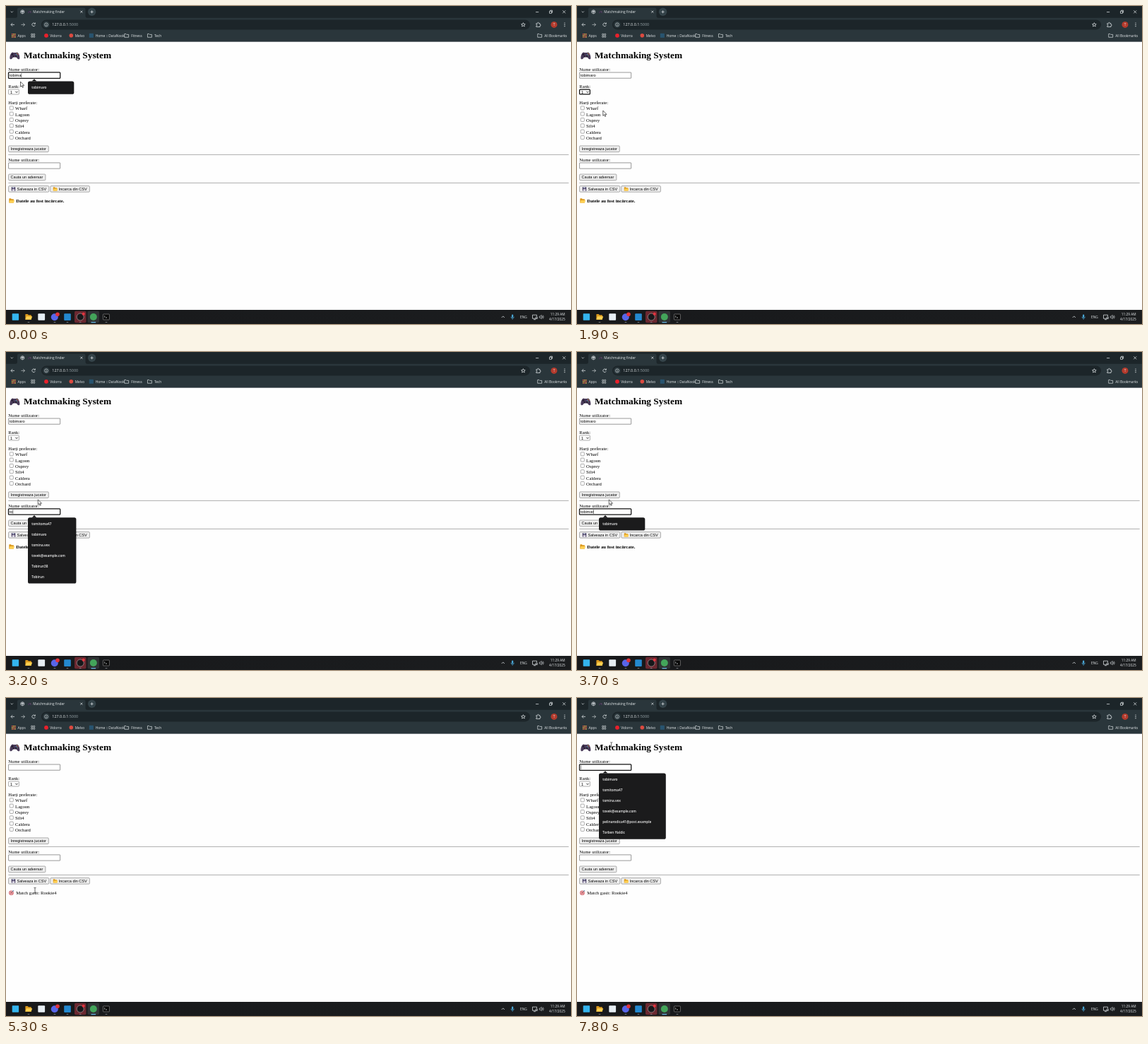
Recreate the animation shown at these times as an HTML page. Size 800 by 450 pixels, loop 8 s.

```html
<!DOCTYPE html>
<html lang="ro">
<head>
<meta charset="utf-8">
<title>Matchmaking finder</title>
<style>
html, body { margin: 0; width: 100%; height: 100%; overflow: hidden; background: #fff; }
svg { display: block; width: 100vw; height: 100vh; }
text { white-space: pre; }
.ui { font-family: "Open Sans", "Noto Sans", sans-serif; font-size: 4.8px; fill: #e6eaec; }
.page { font-family: "Liberation Serif", "Times New Roman", serif; font-size: 6.667px; }
.ctl { font-family: "Liberation Sans", Arial, sans-serif; font-size: 5.555px; }
.opt { font-family: "Open Sans", "Noto Sans", sans-serif; font-size: 4.75px; font-weight: 600; fill: #f1f1f1; }
.line { fill: none; stroke: #dfe5e7; stroke-width: .75; }
</style>
</head>
<body>
<svg id="stage" viewBox="0 0 800 450" preserveAspectRatio="none">
  <defs>
    <symbol id="pad" viewBox="0 0 16 12" overflow="visible">
      <path d="M4 1.2Q5 .7 6 1.5H10Q11 .7 12 1.2C14 2 15.6 7 15.4 9.6C15.2 12 13 11.7 11.4 9.6L10.4 8.3H5.6L4.6 9.6C3 11.7.8 12 .6 9.6C.4 7 2 2 4 1.2Z" fill="#493b59"/>
      <path d="M3 4.2H6M4.5 2.7V5.7" stroke="#201a2b" stroke-width="1.1"/>
      <circle cx="6.2" cy="7" r="1.2" fill="#241c30"/><circle cx="9.8" cy="7" r="1.2" fill="#241c30"/>
      <circle cx="11.5" cy="2.8" r=".7" fill="#d9a441"/><circle cx="13" cy="4.2" r=".7" fill="#d2485a"/>
      <circle cx="10.1" cy="4.2" r=".7" fill="#4e8fd0"/><circle cx="11.5" cy="5.5" r=".7" fill="#53a869"/>
    </symbol>
    <symbol id="folder" viewBox="0 0 16 14" overflow="visible">
      <path d="M1 2Q1 1 2 1H6L8 3H13Q14 3 14 4V13H1Z" fill="#dc9a1e"/>
      <path d="M3.5 6H16L13.6 13H1Z" fill="#ffd052"/>
    </symbol>
    <symbol id="disk" viewBox="0 0 14 14" overflow="visible">
      <path d="M1 1H13V13H2.5L1 11.5Z" fill="#45395f"/>
      <path d="M4 1H10.5V5H4Z" fill="#b8c4d6"/><path d="M3.2 7.5H10.8V13H3.2Z" fill="#e9e6f0"/>
      <path d="M8.2 1.6H9.6V4.3H8.2Z" fill="#45395f"/>
    </symbol>
    <symbol id="target" viewBox="0 0 16 16" overflow="visible">
      <circle cx="7.5" cy="8.5" r="7" fill="#cf4b55"/><circle cx="7.5" cy="8.5" r="5" fill="#f3e9e9"/>
      <circle cx="7.5" cy="8.5" r="3.4" fill="#cf4b55"/><circle cx="7.5" cy="8.5" r="1.4" fill="#f3e9e9"/>
      <path d="M7.5 8.5L14 2" stroke="#4d5560" stroke-width="1.2"/>
      <path d="M11.5 4.5L12 1.6L14 0L14.3 1.8L16 2.2L14.3 4Z" fill="#5b8fb5"/>
    </symbol>
    <symbol id="tray" viewBox="0 0 8 7" overflow="visible">
      <path class="line" d="M1 1H3L4 2H7.2V6.2H.8V1Z"/>
    </symbol>
    <linearGradient id="bar"><stop offset="0" stop-color="#18191b"/><stop offset="1" stop-color="#1b1d1f"/></linearGradient>
    <clipPath id="selClip"><rect id="selCut" x="14" y="270" height="10" width="0"/></clipPath>
  </defs>
  <rect width="800" height="450" fill="#fefefe"/>
  <g id="browser"></g>
  <g id="page"></g>
  <g id="live"></g>
  <g id="taskbar"></g>
  <g id="mouse">
    <path id="arrow" d="M0 0V7.3L1.7 5.8L2.8 8.4L4 7.9L2.9 5.4H5.2Z" fill="#fff" stroke="#111" stroke-width=".65" stroke-linejoin="round"/>
    <path id="beam" d="M-1.5 -3.6Q0 -3.6 0 -3Q0 -3.6 1.5 -3.6M0 -3V3M-1.5 3.6Q0 3.6 0 3Q0 3.6 1.5 3.6" fill="none" stroke="#222" stroke-width=".7"/>
  </g>
</svg>
<script>
const $ = id => document.getElementById(id);
const LOOP = 8000, STEP = 100;
const USER = "tobimaro", FOUND = "Match gasit: Rookie4";

const text = (x, y, s, cls, more = "") => `<text x="${x}" y="${y}" class="${cls}" ${more}>${s}</text>`;
const rect = (x, y, w, h, fill, r = 0, more = "") =>
  `<rect x="${x}" y="${y}" width="${w}" height="${h}" rx="${r}" fill="${fill}" ${more}/>`;
const dot = (x, y, r, fill, more = "") => `<circle cx="${x}" cy="${y}" r="${r}" fill="${fill}" ${more}/>`;
const line = (d, more = "") => `<path class="line" d="${d}" ${more}/>`;
const icon = (id, x, y, w, h) => `<use href="#${id}" x="${x}" y="${y}" width="${w}" height="${h}"/>`;
const edge = 'stroke="#767676" stroke-width=".6"';

function drawBrowser() {
  let s = rect(0, 0, 800, 50.4, "#1c2529") + rect(0, 16.8, 800, 33.6, "#2a363b");
  s += `<path d="M13 17Q16 17 16 14V5Q16 2.5 18.5 2.5H110Q112.500 2.5 112.500 5V14Q112.500 17 115.500 17Z" fill="#2a363b"/>`;
  s += line("M6.7 7.5L8.300 9.100L9.900 7.5");
  s += line("M20.700 8.300H26M23.300 5.700V11M21.300 6.900Q23.300 8.300 25.300 6.900") + dot(23.3, 8.3, 2.6, "none", 'stroke="#dfe5e7" stroke-width=".6"');
  s += icon("pad", 31, 6.7, 5, 3.8) + text(38.2, 10.3, "Matchmaking finder", "ui");
  s += line("M105.300 6.700L108.300 9.700M108.300 6.700L105.300 9.700");
  s += dot(121.6, 8.3, 5.7, "#344349") + line("M119.600 8.300H123.600M121.600 6.300V10.300");
  s += line("M750 8.600H754.200M788.200 6.300L792.200 10.300M792.200 6.300L788.200 10.300");
  s += line("M769.500 7.300H772.500V10.300H769.500ZM770.600 7V6.200H773.600V9.200H772.700");

  s += line("M12 26.400H7M9.200 24.100L7 26.400L9.200 28.700");
  s += line("M21.500 26.400H26.500M24.300 24.100L26.500 26.400L24.300 28.700", 'opacity=".8"');
  s += line("M41 25A2.300 2.300 0 1 0 41.300 27.200M41.400 23.500V25.300H39.600");
  s += rect(50, 19.4, 692, 14, "#1c2529", 7) + dot(57, 26.4, 4.9, "#2b383d");
  s += dot(57, 26.4, 2.5, "none", 'stroke="#dfe5e7" stroke-width=".6"') + line("M57 25.900V27.700M57 24.800V25.300");
  s += text(65.3, 28.4, '127.0.0.1<tspan fill="#98a4a9">:5000</tspan>', "ui", 'style="font-size:5.45px"');
  s += line("M732.400 23.700L733.200 25.500L735.200 25.700L733.700 27L734.200 29L732.400 27.900L730.600 29L731.100 27L729.600 25.700L731.600 25.500Z", 'stroke-width=".6"');
  s += line("M750.800 24.700H752.500Q752.500 23.300 753.500 23.300T754.500 24.700H756V26.200Q757.200 26.200 757.200 27.100T756 28V29.500H750.800V28Q752 28 752 27.100T750.800 26.200Z");
  s += dot(776, 26.4, 4.5, "#b43a2c") + text(776, 28, "T", "ui", 'text-anchor="middle"');
  for (const y of [24.1, 26.4, 28.7]) s += dot(791, y, .65, "#e6eaec");

  const tints = ["#e4574f", "#dfb44c", "#e08b47"];
  for (let i = 0; i < 9; i++) s += rect(8 + i % 3 * 2.1, 39 + Math.floor(i / 3) * 2.1, 1.5, 1.5, tints[(i + Math.floor(i / 3)) % 3]);
  s += text(16.5, 43.5, "Apps", "ui");
  for (const x of [35.7, 38.7]) for (const y of [39.3, 42.3]) s += rect(x, y, 2, 2, "none", .4, 'stroke="#dfe5e7" stroke-width=".65"');
  s += dot(57, 41.8, 2.9, "#e9202b") + text(62.3, 43.5, "Vidorra", "ui");
  s += dot(92.3, 41.8, 2.8, "#dc4a40") + text(97.7, 43.5, "Melvo", "ui");
  s += rect(117.8, 38.8, 6, 6, "#28546f") + text(126.7, 43.5, "Home :: DataNook", "ui");
  for (const [x, label] of [[167, "Fitness"], [199.7, "Tech"], [752, "All Bookmarks"]])
    s += icon("tray", x, 38.5, 7.4, 6.5) + text(x + 10.2, 43.5, label, "ui");
  return s;
}

const button = (x, y, w, label, dx = 3.3) =>
  rect(x + .3, y, w, 8.6, "#efefef", 1.2, edge) + text(x + dx, y + 6.2, label, "ctl");

function drawPage() {
  let s = icon("pad", 4.8, 64.3, 15.2, 12);
  s += text(25, 74.1, "Matchmaking System", "page", 'font-weight="bold" style="font-size:13.333px"');
  s += text(3.3, 92.2, "Nume utilizator:", "page") + text(3.3, 115.9, "Rank:", "page");
  s += text(3.3, 138.7, "Harți preferate:", "page");
  ["Wharf", "Lagoon", "Osprey", "Silt4", "Caldera", "Orchard"].forEach((map, i) => {
    const y = 144.4 + i * 8.33;
    s += rect(5.3, y - 2.6, 5, 5, "#fff", .9, edge) + text(13.1, y + 2.8, map, "page");
  });
  s += button(3.3, 197.9, 56.7, "Inregistreaza jucator");
  s += text(3.3, 220.1, "Nume utilizator:", "page");
  s += button(3.3, 238, 52.3, "Cauta un adversar");
  for (const y of [210.3, 250.3]) s += rect(3.3, y - .4, 793.4, .8, "#9a9a9a");
  s += button(3.3, 254.6, 57.2, "Salveaza in CSV", 12.2) + icon("disk", 7.3, 255.8, 6.4, 6.4);
  s += button(62.5, 254.6, 55.6, "Incarca din CSV", 12.2) + icon("folder", 66.3, 255.8, 7, 6.3);
  return s;
}

function drawTaskbar() {
  let s = rect(0, 430, 800, 20, "url(#bar)");
  s += rect(97, 431.8, 16.5, 16.5, "#6b2830", 1.8) + rect(115.5, 431.8, 16.5, 16.5, "#303335", 1.8);
  s += rect(8.7, 435.3, 9.4, 9.4, "#34b4ee", .6) + icon("folder", 26.7, 435.2, 10.5, 9.4);
  s += rect(45.3, 435.2, 9.8, 9.6, "#e6edf3", 1);
  s += dot(68.8, 440.2, 5, "#5865e8") + dot(73, 436.2, 2.8, "#e0343c");
  s += rect(82.2, 435.3, 9.6, 9.6, "#2489d0", 1) + dot(105.2, 440, 5, "#17171a", 'stroke="#d8cccd" stroke-width=".5"');
  s += dot(109.7, 435.8, 2.1, "#e3343e") + dot(123.8, 440, 5, "#43a45a");
  s += rect(137.4, 436, 9, 8, "#080808", .7, 'stroke="#999" stroke-width=".6"') + line("M139 438.500L140.200 439.500L139 440.500M141 441H143");
  for (const x of [32, 69, 87, 105.2, 142]) s += rect(x - 1.4, 447.2, 2.8, .9, "#93989c", .4);
  s += rect(120.4, 447.1, 6.8, 1.1, "#69b9e8", .5);
  s += line("M701.700 441L703.800 438.900L705.900 441");
  s += rect(716.1, 436.6, 2.1, 4.3, "#4cadde", 1) + line("M715 439.700Q715 442 717.150 442T719.300 439.700M717.150 442V443.700", 'style="stroke:#4cadde"');
  s += text(728, 441.9, "ENG", "ui");
  s += line("M751 442.300H745.500V437.200H751.500V439M747 443.700H750M750.300 440H752.300V442.500H750.300Z");
  s += line("M755.300 439H756.500L758.200 437.400V442.700L756.500 441.200H755.300ZM759.400 438.700Q760.200 440 759.400 441.400M760.400 437.700Q762 440 760.400 442.400", 'style="stroke-width:.6"');
  return s + text(791.7, 438.4, "11:29 AM", "ui", 'text-anchor="end"') + text(791.7, 445.4, "4/17/2025", "ui", 'text-anchor="end"');
}

$("browser").innerHTML = drawBrowser();
$("page").innerHTML = drawPage();
$("taskbar").innerHTML = drawTaskbar();

function field(y, value, focus, caret) {
  let s = focus
    ? rect(3.5, y + .1, 73.2, 8.4, "#fff", .9, 'stroke="#101010" stroke-width="1.25"')
    : rect(3.6, y + .2, 73, 8.2, "#fff", .3, 'stroke="#767676" stroke-width=".75"');
  s += text(4.9, y + 6.2, value, "ctl");
  if (caret) s += rect(5 + widthOf(value, "ctl"), y + 1.5, .5, 5.8, "#111");
  return s;
}

function popup(y, w, items, alpha = 1) {
  let s = `<path d="M36.500 ${y + .2}L40 ${y - 3.2}L43.500 ${y + .2}Z" fill="#1b1b1c"/>`;
  s += rect(31, y, w, items.length * 15 + 3.4, "#1b1b1c", 2.6);
  items.forEach((item, i) => s += text(36.3, y + 10.8 + i * 15, item, "opt"));
  return `<g opacity="${alpha}">${s}</g>`;
}

const widths = {};
function widthOf(s, cls) {
  if (!s) return 0;
  const key = cls + s;
  if (!(key in widths)) {
    $("live").innerHTML = text(0, 0, s, cls);
    widths[key] = $("live").firstChild.getComputedTextLength();
  }
  return widths[key];
}

// Value of the last entry [time, value] already reached.
const at = (t, steps) => steps.reduce((v, [from, next]) => t >= from ? next : v, steps[0][1]);

const path = [
  [0, 20.5, 107], [1000, 20.5, 107], [1300, 13, 121], [1500, 14, 122], [1800, 36.8, 148],
  [2700, 36.8, 147.7], [3000, 44, 225], [3100, 45.3, 208.8], [4300, 45.3, 208.8],
  [4700, 33, 242], [5000, 36, 246], [5300, 41, 272], [5600, 45, 302], [6000, 15, 275.3],
  [6100, 15, 275.3], [6600, 74, 275.5], [6800, 80.8, 276.2], [6900, 80.8, 276.2],
  [7400, 45, 98], [7500, 45, 98], [7800, 48.7, 66.3], [8000, 48.7, 66.3]
];
function mouseAt(t) {
  const i = path.findIndex(p => p[0] > t), [t0, x0, y0] = path[i - 1], [t1, x1, y1] = path[i];
  const k = (t - t0) / (t1 - t0), e = k * k * (3 - 2 * k);
  return [x0 + (x1 - x0) * e, y0 + (y1 - y0) * e];
}

const saved = ["tomitoma47", USER, "tomina.vex", "tovek@example.com", "Tobirun38", "Tobirun"];
const recent = [USER, "tomitoma47", "tomina.vex", "tovek@example.com", "pelinarodica41@post.example", "Torben Haldic"];

function popups(t) {
  if (t < 500) return popup(106.4, 65.3, [USER], at(t, [[0, 1], [300, .6], [400, .2]]));
  if (t >= 3100 && t < 3400) return popup(234.2, 68.4, saved);
  if (t >= 3400 && t < 3600) return popup(234.2, 67, [USER, "Tobirun38", "Tobirun", "tobi.nel"]);
  if (t >= 3600 && t < 4000) return popup(234.2, 65.3, [USER], t < 3900 ? 1 : .4);
  if (t >= 7600) return popup(106.4, 94.8, recent);
  return "";
}

function draw(t) {
  const focus = at(t, [[0, "name"], [1300, "rank"], [2100, ""], [3000, "foe"], [4700, ""], [7500, "name"]]);
  const caret = at(t, [[0, true], [700, false], [1200, true], [4300, false], [4700, true]]);
  const typedName = at(t, [[0, 6], [100, 7], [200, 8], [4900, 0]]);
  const typedFoe = at(t, [[0, 0], [3100, 1], [3200, 2], [3300, 3], [3400, 4], [3600, 6], [3700, 7], [3800, 8], [4900, 0]]);
  const [mx, my] = mouseAt(t), found = t >= 4900;
  const full = widthOf(FOUND, "page");

  let s = field(93.8, USER.slice(0, typedName), focus === "name", caret && focus === "name");
  s += field(221.7, USER.slice(0, typedFoe), focus === "foe", caret && focus === "foe");
  s += focus === "rank"
    ? rect(3.6, 118.2, 14.8, 6.7, "#fff", 1, 'stroke="#101010" stroke-width="1.25"')
    : rect(3.6, 118, 14.8, 7, "#fff", .8, edge);
  s += text(5.9, 123.5, "1", "ctl") + `<path d="M13.300 120.800L15 122.500L16.700 120.800" fill="none" stroke="#111" stroke-width=".9"/>`;

  let cut = 0;
  if (found) {
    if (t >= 6100 && t < 7500) cut = t >= 6600 ? full : Math.max(0, Math.min(full, mx - 14));
    s += icon("target", 4, 271.7, 7.4, 7.4) + text(14.2, 277.5, FOUND, "page");
    if (cut) s += rect(14.2, 270.9, cut, 8.2, "#2c68cf") + text(14.2, 277.5, FOUND, "page", 'fill="#fff" clip-path="url(#selClip)"');
  } else {
    s += icon("folder", 3.8, 271.8, 8.2, 7.2) + text(14.2, 277.5, "Datele au fost încărcate.", "page", 'font-weight="bold"');
  }
  $("selCut").setAttribute("width", cut + .2);
  $("live").innerHTML = s + popups(t);

  const beam = (t >= 2900 && t < 3100) || (t >= 5200 && t < 5500) || (t >= 5900 && t < 6700) || t >= 7400;
  $("mouse").setAttribute("transform", `translate(${mx.toFixed(2)} ${my.toFixed(2)})`);
  $("arrow").style.display = beam ? "none" : "";
  $("beam").style.display = beam ? "" : "none";
}

const start = performance.now();
let last = -1;
function tick(now) {
  const t = Math.floor(Math.max(0, now - start) % LOOP / STEP) * STEP;
  if (t !== last) draw(last = t);
  requestAnimationFrame(tick);
}
draw(0);
requestAnimationFrame(tick);
</script>
</body>
</html>
```
